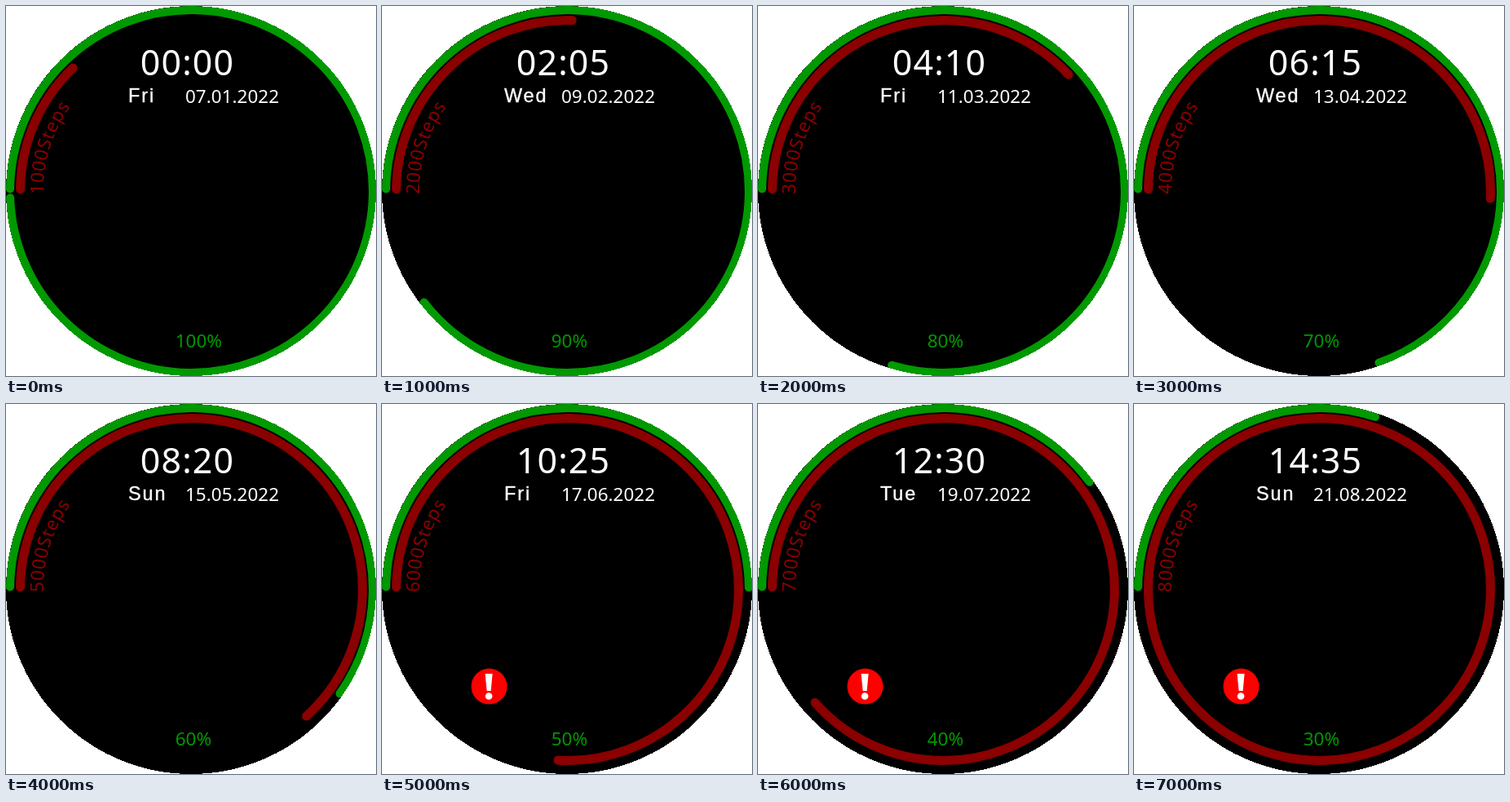
These frames come from a looping animation (454 px wide and 454 px high, 8000 ms). An HTML page:

```html
<!DOCTYPE html>
<html lang="en">
<head>
<meta charset="utf-8">
<style>
  html, body { margin: 0; width: 100%; height: 100%; overflow: hidden; background: #fff; }
  svg { display: block; width: 454px; height: 454px; }
  text { font: 22.5px "Noto Sans", "Open Sans", sans-serif; fill: #fff; white-space: pre; }
  #time { font-size: 43px; letter-spacing: 1.1px; }
  #day { font: 23.4px "Liberation Sans", Arial, sans-serif; letter-spacing: 1.9px; stroke: #fff; stroke-width: .4px; }
  #battery { fill: #090; }
  #steps { fill: #8b0000; letter-spacing: .65px; }
  .ring { fill: none; stroke-linecap: round; }
</style>
</head>
<body>
<svg viewBox="0 0 454 454">
  <defs>
    <path id="curve" d="M46 231A181.5 181.5 0 0 1 227.5 46"/>
  </defs>
  <rect width="454" height="454"/>
  <g transform="rotate(180.8 227.5 227.5)">
    <circle id="batteryRing" class="ring" cx="227.5" cy="227.5" r="222.5" pathLength="360" stroke="#090" stroke-width="10"/>
    <circle id="stepsRing" class="ring" cx="227.5" cy="227.5" r="210" pathLength="360" stroke="#8b0000" stroke-width="11"/>
  </g>
  <circle cx="227" cy="227" r="327" fill="none" stroke="#fff" stroke-width="200" shape-rendering="crispEdges"/>
  <text id="time" x="164.8" y="85"></text>
  <text id="day" x="150" y="118.3"></text>
  <text id="date" x="220" y="119"></text>
  <text id="battery" x="207.7" y="419"></text>
  <text><textPath id="steps" href="#curve"></textPath></text>
  <g id="warning">
    <circle cx="131.5" cy="346.5" r="22" fill="red"/>
    <path d="M126.6 331H135.6L133.6 352H128.6Z" fill="#fff"/>
    <circle cx="131.1" cy="358.5" r="4.3" fill="#fff"/>
  </g>
</svg>
<script>
  const el = id => document.getElementById(id);
  const pad = n => String(n).padStart(2, '0');
  const days = ['Sun', 'Mon', 'Tue', 'Wed', 'Thu', 'Fri', 'Sat'];
  const setArc = (id, degrees) =>
    el(id).setAttribute('stroke-dasharray', `${degrees} 360`);

  function show(i) {
    const battery = 100 - 10 * i;
    const date = 7 + 2 * i;
    el('time').textContent = `${pad(2 * i)}:${pad(5 * i)}`;
    el('day').textContent = days[new Date(2022, i, date).getDay()];
    el('date').textContent = `${pad(date)}.${pad(i + 1)}.2022`;
    el('battery').textContent = `${battery}%`;
    el('steps').textContent = `${(i + 1) * 1000}Steps`;
    setArc('batteryRing', 3.572 * battery);
    setArc('stepsRing', 45.4 * (i + 1));
    el('warning').style.display = battery <= 50 ? '' : 'none';
  }

  const start = performance.now();
  let current = -1;
  function tick() {
    const i = Math.floor((performance.now() - start) / 1000) % 8;
    if (i !== current) show(current = i);
    requestAnimationFrame(tick);
  }
  tick();
</script>
</body>
</html>
```
